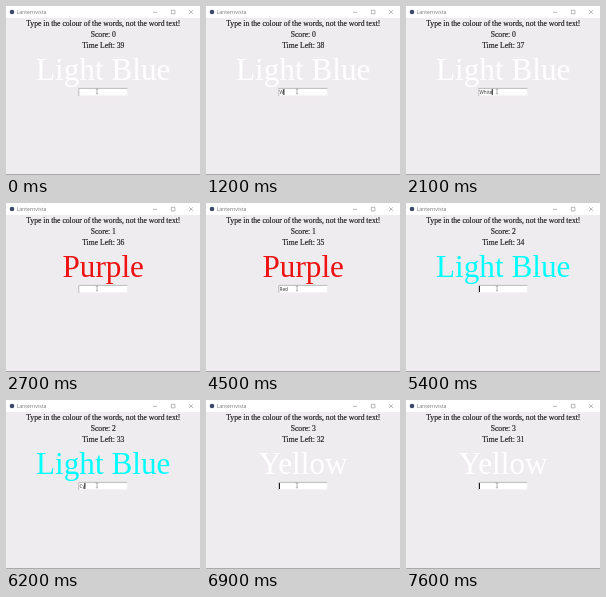
Write an HTML page that moves like this. It is 194 px wide and 169 px high and loops after 8000 ms.

```html
<!DOCTYPE html>
<html lang="en">
<head>
<meta charset="utf-8">
<title>Colour word game</title>
<style>
  html, body { margin: 0; width: 100%; height: 100%; overflow: hidden; background: #efecef; }
  svg { display: block; width: 194px; height: 169px; }
  text { white-space: pre; font-kerning: none; }
  .label { font: 7.65px "Liberation Serif", serif; text-anchor: middle; fill: #1c1c1c; stroke: #1c1c1c; stroke-width: .15; }
  #word { font: 31.2px "Liberation Serif", serif; text-anchor: middle; }
  .ui { font-family: "Open Sans", sans-serif; }
  .line { fill: none; stroke: #888; stroke-width: .6; }
</style>
</head>
<body>
<svg viewBox="0 0 194 169">
  <rect width="194" height="169" fill="#efecef"/>
  <rect width="194" height="12" fill="#fff"/>
  <circle cx="6" cy="6" r="2.3" fill="#3d4a6b"/>
  <text class="ui" x="10.5" y="8" font-size="5.2" fill="#777">Lanternvista</text>
  <path class="line" d="M147 6.3h4M165.3 4.3h3.6v3.6h-3.6zM183.2 4.2l3.8 3.8m0-3.8l-3.8 3.8"/>
  <path d="M0 168.5H194" stroke="#aaa" fill="none"/>

  <text class="label" x="97.3" y="19.7">Type in the colour of the words, not the word text!</text>
  <text class="label" x="97.3" y="30.7" id="score"></text>
  <text class="label" x="97.3" y="41.7" id="left"></text>
  <text id="word" x="97.2" y="74"></text>

  <rect x="72.5" y="82" width="49" height="8" fill="#fff"/>
  <path d="M72.8 90V82.4H121.5" fill="none" stroke="#aaa" stroke-width=".8"/>
  <path d="M73 89.7H121.2V82.5" fill="none" stroke="#e6e4e6" stroke-width=".5"/>
  <text class="ui" x="73.5" y="88" font-size="4.7" fill="#333" id="entry"></text>
  <rect y="83" width=".9" height="6" id="caret"/>
  <path class="line" d="M89.8 83.2h2.4M91 83.2v4.6M89.8 87.8h2.4"/>
</svg>
<script>
const $ = id => document.getElementById(id);
const LOOP = 8000;

// Each round: start time, word, colour, answer, time of each keystroke
const rounds = [
  [0, "Light Blue", "#fff", "White", [1000, 1300, 1600, 1900, 2000]],
  [2400, "Purple", "#ee1212", "Red", [3700, 4000, 4300]],
  [4700, "Light Blue", "#0ff", "Cyan", [5800, 6200, 6400, 6600]],
  [6900, "Yellow", "#fff", "", []]
];

function draw(t) {
  const score = rounds.filter(r => r[0] <= t).length - 1;
  const [, word, colour, answer, keys] = rounds[score];
  $("score").textContent = "Score: " + score;
  $("left").textContent = "Time Left: " + (39 - Math.floor((t + 400) / 1000));
  $("word").textContent = word;
  $("word").setAttribute("fill", colour);

  const entry = $("entry");
  entry.textContent = answer.slice(0, keys.filter(k => k <= t).length);
  $("caret").setAttribute("x", 73.1 + entry.getComputedTextLength());

  // Caret: 600 ms on, 300 ms off
  const blink = (t + (t < 4600 ? 600 : 500)) % 900;
  $("caret").setAttribute("opacity", blink < 600 ? 1 : 0);
}

function tick() {
  draw(performance.now() % LOOP);
  requestAnimationFrame(tick);
}
tick();
</script>
</body>
</html>
```
